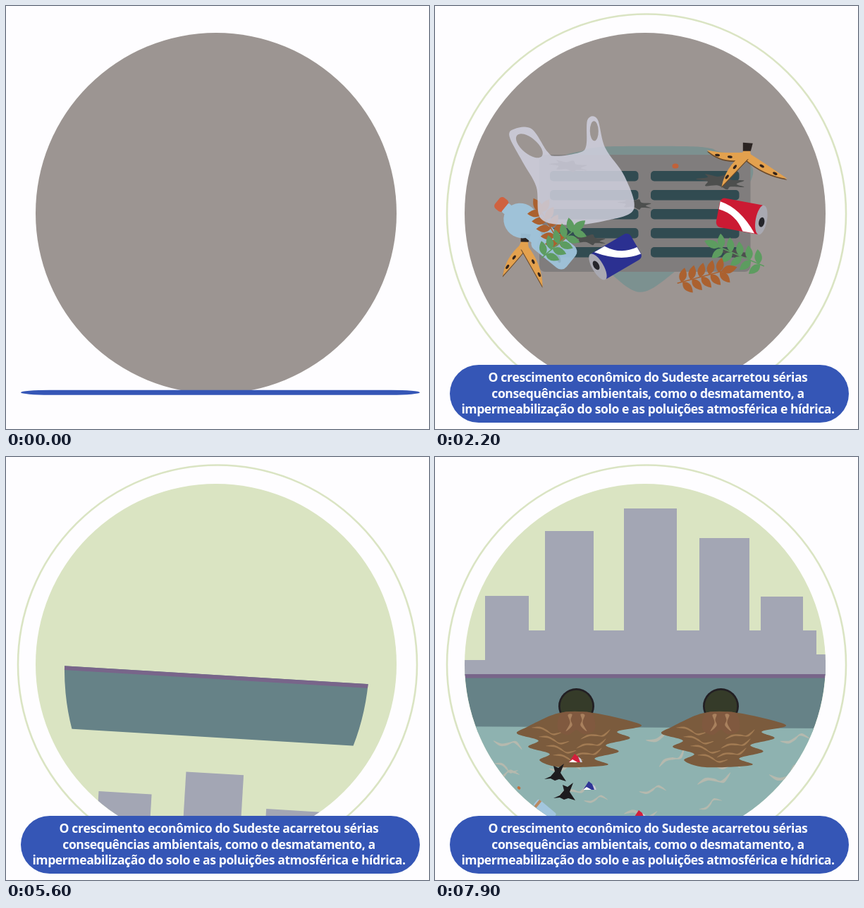
These frames come from a looping animation (600x600 px, 8000 ms). An HTML page with a canvas:

```html
<!DOCTYPE html>
<html lang="pt">
<head>
<meta charset="utf-8">
<style>
html, body { margin: 0; width: 100%; height: 100%; overflow: hidden; background: #fefdff; }
canvas { position: absolute; left: 0; top: 0; width: 600px; height: 600px; }
.line {
  position: absolute; left: 2px; width: 600px; height: 24px;
  text-align: center; white-space: pre; color: #fff;
  font: bold 17.6px/24px "Open Sans", "Noto Sans", sans-serif; letter-spacing: -0.45px;
}
.line span { display: inline-block; }
</style>
</head>
<body>
<canvas id="stage" width="600" height="600"></canvas>
<script>
const ctx = document.getElementById('stage').getContext('2d');
const LOOP = 8, TAU = Math.PI * 2;
const CX = 298, CY = 294, R = 256;

const clamp = (v, a = 0, b = 1) => Math.min(b, Math.max(a, v));
const span = (t, a, b) => clamp((t - a) / (b - a));
const mix = (a, b, k) => a + (b - a) * k;
const easeOut = u => 1 - (1 - u) ** 3;
const spring = (t, k = 5, w = 5) => t <= 0 ? 0 : 1 - Math.exp(-k * t) * Math.cos(w * t);
const backOut = u => 1 + 2.7 * (u - 1) ** 3 + 1.7 * (u - 1) ** 2;
const noise = i => { const v = Math.sin(i * 12.9898 + 4.1) * 43758.5453; return v - Math.floor(v); };
const root = v => Math.sign(v) * Math.sqrt(Math.abs(v));

function at(x, y, deg, sx, sy, draw) {
  if (!sx || !sy) return;
  ctx.save();
  ctx.translate(x, y);
  ctx.rotate(deg * Math.PI / 180);
  ctx.scale(sx, sy);
  draw();
  ctx.restore();
}
function fill(color, rule) { ctx.fillStyle = color; ctx.fill(rule || 'nonzero'); }
function rect(x, y, w, h, color) { ctx.fillStyle = color; ctx.fillRect(x, y, w, h); }
function round(x, y, w, h, r, color) {
  ctx.beginPath(); ctx.roundRect(x, y, w, h, r); fill(color);
}
function oval(x, y, rx, ry, color, rot = 0) {
  ctx.beginPath(); ctx.ellipse(x, y, rx, ry, rot, 0, TAU); fill(color);
}
function poly(p, color) {
  ctx.beginPath();
  for (let i = 0; i < p.length; i += 2) ctx.lineTo(p[i], p[i + 1]);
  fill(color);
}
// Closed smooth curve through flat x,y points
function curve(p) {
  const n = p.length / 2, X = i => p[(i + n) % n * 2], Y = i => p[(i + n) % n * 2 + 1];
  ctx.moveTo(X(0), Y(0));
  for (let i = 0; i < n; i++) {
    ctx.bezierCurveTo(
      X(i) + (X(i + 1) - X(i - 1)) / 6, Y(i) + (Y(i + 1) - Y(i - 1)) / 6,
      X(i + 1) - (X(i + 2) - X(i)) / 6, Y(i + 1) - (Y(i + 2) - Y(i)) / 6,
      X(i + 1), Y(i + 1));
  }
  ctx.closePath();
}
function blob(p, color) { ctx.beginPath(); curve(p); fill(color); }
function ring(n, point) {
  return Array.from({ length: n }, (_, i) => point(i / n * TAU, i)).flat();
}

// ---- street litter ----
function puddle() {
  blob(ring(48, a => {
    const c = Math.cos(a), s = Math.sin(a);
    const x = root(c) * (182 + 32 * Math.abs(Math.sin(3 * a))) - 10 * s;
    const y = s > 0 ? 95 * root(s) + 57 * Math.exp(-((x / 50) ** 2)) : 130 * root(s);
    return [x, y];
  }), '#7c9190');
}
function smudge(x, y, w) {
  blob(ring(14, (a, i) => {
    const k = i % 2 ? 1 : 0.6, c = Math.cos(a) * w, s = Math.sin(a) * w;
    return [x + c * k, y + s * 0.3 * k + c * 0.1];
  }), '#4d4f4e');
}
function grate() {
  round(148, 211, 299.5, 166, 8, '#807d7d');
  for (let i = 0; i < 5; i++) {
    for (const x of [163, 306]) round(x, 234 + i * 27, 125.5, 14.5, 5, '#314b51');
  }
  smudge(406, 249, 36); smudge(284, 281, 25); smudge(425, 351, 27);
  smudge(190, 227, 28); smudge(218, 331, 26);
  oval(341, 227, 4.5, 3.5, '#c0623a');
}
function hole(x, y, rx, ry, rot) {
  ctx.moveTo(x + rx * Math.cos(rot), y + rx * Math.sin(rot));
  ctx.ellipse(x, y, rx, ry, rot, 0, TAU);
}
function bag() {
  ctx.beginPath();
  curve([-79,-64, -70,-74, -46,-70, -29,-35, -18,-27, 16,-27, 27,-36, 34,-71, 48,-70,
    53,-28, 74,16, 80,64, 40,74, -10,73, -52,58, -52,12, -66,-26]);
  hole(-53, -47, 23, 11, 0.85);
  hole(41, -54, 14, 6, 1.7);
  fill('rgba(208,208,222,.86)', 'evenodd');
}
function bottle() {
  round(-71, -10, 15, 20, 5, '#cf6240');
  ctx.beginPath();
  ctx.roundRect(-57, -8, 14, 16, 2);
  hole(-27, 0, 26, 24, 0);
  ctx.roundRect(-12, -15, 24, 30, 4);
  ctx.roundRect(2, -20, 62, 40, 10);
  fill('rgba(160,197,220,.94)');
  for (let i = 0; i < 4; i++) oval(8 + i * 13, i % 2 ? 8 : -6, 7, 3, '#8fb0c2', 0.5);
}
const can = color => () => {
  round(-34.5, -21, 66, 42, 7, color);
  ctx.beginPath();
  ctx.moveTo(-34, -15);
  ctx.quadraticCurveTo(-4, -11, 22, 20.5);
  ctx.lineTo(5, 20.5);
  ctx.quadraticCurveTo(-9, -2, -34, -4);
  fill('#fff');
  oval(28, 0, 8, 21, '#a9a9b2');
  oval(29, 3, 4, 7, '#25252a');
};
function leg(x, y, bend) {
  const d = Math.hypot(x, y), nx = -y / d, ny = x / d;
  const mx = x * 0.55 + nx * bend, my = y * 0.55 + ny * bend;
  const shape = (o, color) => {
    ctx.beginPath();
    ctx.moveTo(nx * 5, ny * 5 + o);
    ctx.quadraticCurveTo(mx + nx * 8, my + ny * 8 + o, x, y + o);
    ctx.quadraticCurveTo(mx - nx * 7, my - ny * 7 + o, -nx * 5, -ny * 5 + o);
    fill(color);
  };
  shape(1.8, '#6b4a2a');
  shape(0, '#e3a14e');
  for (const k of [0.4, 0.72]) {
    oval(x * k + nx * bend * 0.5, y * k + ny * bend * 0.5, 3.5, 1.8, '#33241c', Math.atan2(y, x));
  }
}
const banana = (...legs) => () => {
  legs.forEach(l => leg(...l));
  poly([-4,-8, 5,-8, 8,5, -8,5], '#e3a14e');
  poly([-6,-18, 8,-18, 6,-7, -5,-6], '#2b2422');
};
const branch = (color, len) => () => {
  ctx.strokeStyle = color;
  ctx.lineWidth = 1.6;
  ctx.beginPath(); ctx.moveTo(-len / 2, 0); ctx.lineTo(len / 2 - 12, 0); ctx.stroke();
  const leaf = (x, a, l) => at(x, 0, a, l, l, () => {
    ctx.beginPath(); ctx.moveTo(0, 0);
    ctx.quadraticCurveTo(0.4, -0.5, 1, 0);
    ctx.quadraticCurveTo(0.4, 0.5, 0, 0);
    fill(color);
  });
  for (let i = 0; i < 5; i++) {
    const x = -len / 2 + 6 + i * len * 0.155;
    leaf(x, -62, 21); leaf(x + 2, 62, 21);
  }
  leaf(len / 2 - 23, 0, 23);
};

const RUST = '#ab612f', LEAF = '#5d9c60';
// Each piece drifts from its first pose to its second: x, y, angle
const ITEMS = [
  [banana([-25, 45, 4], [33, 54, -6]), [133,330,14], [118,353,-2]],
  [bottle, [160,296,45], [125,350,33]],
  [branch(RUST, 80), [156,305,-116], [164,310,-125]],
  [bag, [199,234,-20], [187,240,4]],
  [branch(LEAF, 82), [183,331,-42], [181,331,-39]],
  [can('#2b3091'), [258,343,143], [252,370,157]],
  [banana([-56, -3, -10], [61, 28, 4], [-31, 47, 5]), [437,224,10], [446,199,-1]],
  [can('#cb1a33'), [422,286,4], [450,312,18]],
  [branch(LEAF, 92), [414,324,213], [436,381,192]],
  [branch(RUST, 88), [389,359,-38], [383,407,10]]
];

function street(t) {
  const s = 1 - span(t, 4.7, 5.3) ** 3;
  if (s <= 0) return;
  at(CX, CY, 0, s, s, () => {
    oval(0, 0, R, R, '#9c9592');
    const pop = spring(t - 0.1, 8, 6), grow = pop * (0.62 + 0.1 * (t - 1));
    at(0, 1, 0, grow, grow, puddle);
    at(0, 0, 0, pop, pop, () => { ctx.translate(-CX, -CY); grate(); });
    const m = 1 - (1 - clamp((t - 1) / 3.8, -0.15, 1)) ** 1.7;
    ITEMS.forEach(([draw, a, b], i) => {
      const [x, y, r] = a.map((v, j) => mix(v, b[j], m));
      const k = spring(t - 0.15 - i * 0.03, 8, 7);
      at(x - CX, y - CY, r, k, k, draw);
    });
  });
}

// ---- city and river ----
const TOWERS = [[71,133,197], [156,225,105], [268,343,73], [375,446,115], [462,522,198],
  [133,541,246], [30,560,288], [541,560,280]];

function skyline() {
  ctx.translate(-305.5, -73);
  for (const [a, b, top] of TOWERS) rect(a, top, b - a, 310 - top, '#a3a6b4');
}
function wall() {
  ctx.translate(-CX, -349.5);
  ctx.beginPath(); ctx.arc(CX, CY, R, 0, TAU); ctx.clip();
  rect(30, 308, 540, 83, '#668287');
  rect(30, 308, 540, 5.5, '#78658a');
}
function pipe() {
  oval(0, 0, 25.5, 25.5, '#221f23');
  oval(0, 0, 22.8, 22.8, '#353b29');
}
const swirl = (x, y, deg, sx, sy, color) => at(x, y, deg, sx, sy, () =>
  blob([-1,0.2, -0.5,-0.16, 0,0, 0.4,0.26, 1,-0.2, 0.55,0.42, 0.1,0.26, -0.4,0.06], color));

// Ragged spill: alternating long and short tongues down both sides
function spill() {
  const right = [], left = [];
  for (let i = 0; i < 7; i++) {
    const y = 17 + i * 9.5, w = 92 - i * 8;
    right.push(w - (i % 2 ? 26 : 0), y);
    left.unshift(-w + (i % 2 ? 0 : 22), y + 3);
  }
  blob([24,0, ...right, ...left, -24,0], '#7b5b3d');
  for (let i = 0; i < 7; i++) {
    swirl(i % 2 ? 30 - i * 3 : -42 + i * 5, 24 + i * 6.5, i % 2 ? -12 : 14, 22, 12, '#a27b53');
  }
  blob([-22,1, 0,-1, 22,1, 26,24, 10,30, 0,24, -12,31, -26,23], '#80593f');
  for (const d of [-1, 1]) blob([d*6,2, d*12,3, d*9,14, d*15,26, d*6,18, d*8,10], '#a9815e');
}
const tail = () => poly([-17,8, -8,4, -2,-3, -4,-11, 3,-8, 11,-14, 6,-1, 14,11, 4,8, -2,10, -8,7], '#1d1b1e');
const scrap = color => () => {
  poly([-10,5, -2,-7, 3,-3, 9,5], color);
  poly([-10,5, -5,1, 2,5], '#fff');
  poly([3,-3, 7,0, 9,5, 6,5], '#c9cad4');
};
const flask = () => {
  oval(-43, 0, 2.5, 2, '#c0703f');
  round(-12, -6, 34, 12, 3, '#a3c6de');
  rect(-10, -6, 4, 12, '#b98a62');
};
const FLOATING = [[tail, 172,449], [tail, 185,476], [scrap('#d31f3c'), 200,428],
  [scrap('#2f3597'), 220,467], [scrap('#d31f3c'), 291,508], [flask, 152,497,40]];

function city(t) {
  const open = easeOut(span(t, 4.95, 5.45));
  if (!open) return;
  ctx.save();
  ctx.beginPath(); ctx.arc(CX, CY, R * open, 0, TAU); ctx.clip();
  rect(0, 0, 600, 600, '#dae4c2');

  const rise = 1 - easeOut(span(t, 5.5, 6.7)), big = 1 + 0.117 * rise;
  at(305.5 - 12 * rise, 73 + 488 * rise, 4.4 * rise, big, big, skyline);

  const w = 1 - easeOut(span(t, 5.3, 5.95));
  at(CX - 15 * w, 349.5 + 25 * w, 22 * w, 1 - w, (1 - w) * (1 + 1.7 * w), wall);

  const mouths = [200.5, 405.5];
  mouths.forEach((x, i) => {
    const k = spring(t - 6.15 - i * 0.08, 9, 7);
    at(x, 353.5, 0, k, k, pipe);
  });

  if (t > 6.45) {
    const lift = 170 * Math.exp(-4 * (t - 6.5)), y = 383 + lift, tilt = 0.5 + span(t, 6.9, 7.9);
    poly([30, y - tilt, 570, y + tilt, 570, 600, 30, 600], '#8eb2b0');
    ctx.globalAlpha = span(t, 7.1, 7.6);
    for (let i = 0; i < 20; i++) {
      const x = 80 + i % 5 * 98 + noise(i) * 60, ry = 392 + Math.floor(i / 5) * 30 + noise(i + 40) * 22;
      const l = 16 + noise(i + 80) * 9;
      swirl(x, ry + lift, noise(i + 120) * 60 - 35, l, (i % 2 ? 1 : -1) * l * 0.8, '#b5b9ae');
    }
    ctx.globalAlpha = 1;
  }
  mouths.forEach((x, i) => {
    const k = easeOut(span(t, 7.15 + i * 0.05, 7.75 + i * 0.05));
    at(x, 363, 0, k, k, spill);
  });
  FLOATING.forEach(([draw, x, y, r = 0], i) => {
    const k = easeOut(span(t, 7.25 + i * 0.05, 7.6 + i * 0.05));
    at(x, y + 12 * (1 - k), r, k, k, draw);
  });
  ctx.restore();
}

// ---- caption ----
const glyphs = [];
['O crescimento econômico do Sudeste acarretou sérias',
 'consequências ambientais, como o desmatamento, a',
 'impermeabilização do solo e as poluições atmosférica e hídrica.'].forEach((text, row) => {
  const line = document.createElement('div');
  line.className = 'line';
  line.style.top = 514 + row * 22.5 + 'px';
  for (const ch of text) {
    const s = document.createElement('span');
    s.textContent = ch;
    line.append(s);
    glyphs.push(s);
  }
  document.body.append(line);
});

function caption(t) {
  const k = spring(t + 0.017);
  at(304, 548 + 2 * clamp(k), 0, 1, k, () => round(-283, -41, 566, 82, 41, '#3556b6'));
  glyphs.forEach((g, i) => {
    const from = 0.83 - (glyphs.length - 1 - i) * 0.0043;
    const u = span(t, from, from + 0.6);
    g.style.transform = u < 1 ? `scale(${u > 0 ? backOut(u) : 0})` : 'none';
  });
}

function render(t) {
  rect(0, 0, 600, 600, '#fefdff');
  const s = spring(t - 0.15);
  if (s > 0) {
    ctx.beginPath();
    ctx.arc(300, 294.5, 283 * s, 0, TAU);
    ctx.strokeStyle = '#dae4c3';
    ctx.lineWidth = 2.6;
    ctx.stroke();
  }
  city(t);
  street(t);
  caption(t);
}

const start = performance.now();
function tick() {
  const ms = Math.max(0, performance.now() - start);
  render(Math.floor(ms / 100) % (LOOP * 10) / 10);
  requestAnimationFrame(tick);
}
tick();
</script>
</body>
</html>
```
